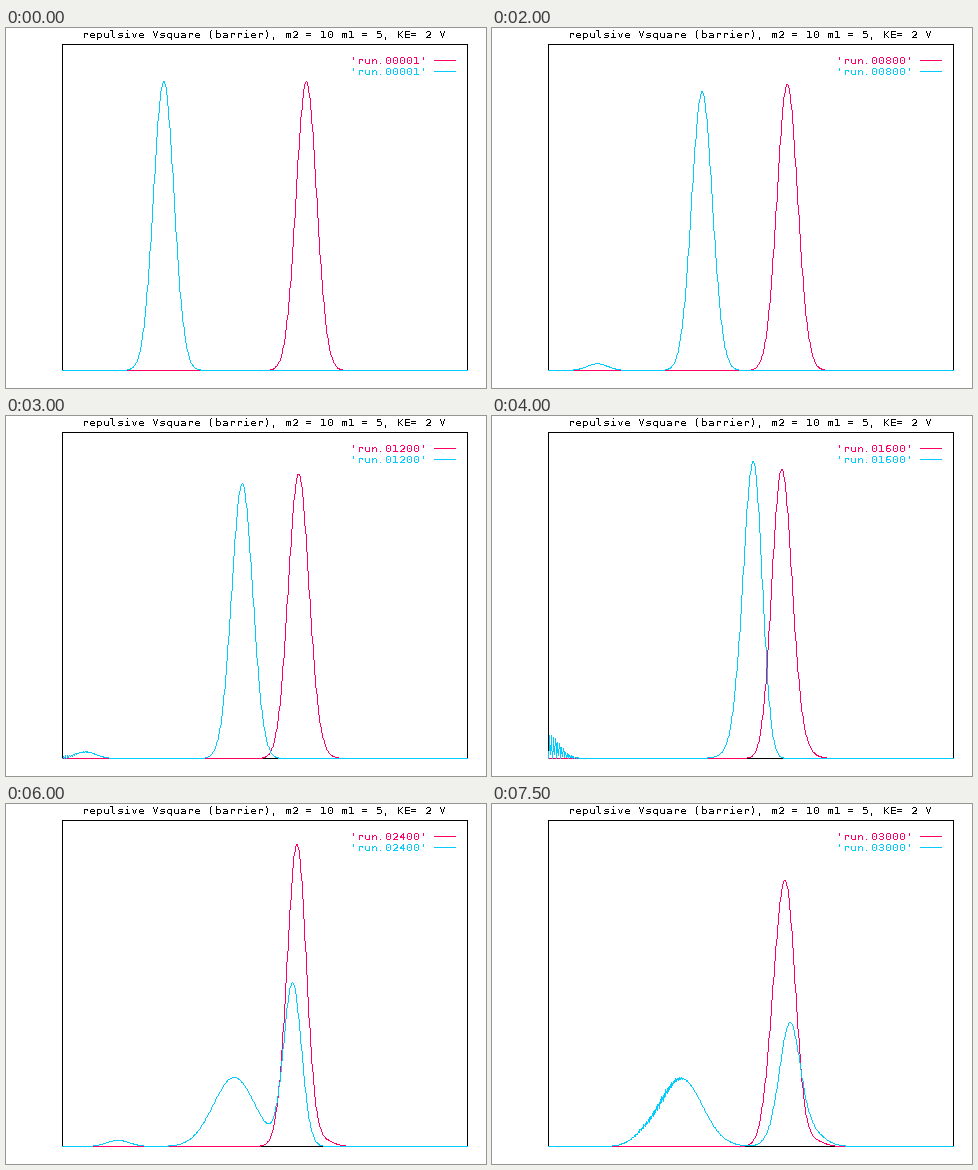
Write a matplotlib script that moves like this. It is 480x360 px and loops after 8000 ms.

```python
import numpy as np
import matplotlib as mpl
import matplotlib.pyplot as plt
from matplotlib.animation import FuncAnimation

mpl.rcParams.update({"text.antialiased": False, "text.hinting": "default",
                     "text.hinting_factor": 1})

# stage layout in pixels
W, H, DPI = 480, 360, 100
LEFT, RIGHT, TOP, BASE = 56, 461, 16, 342
PEAK, CELL = 289, 7
PX = (RIGHT - LEFT) / 1.4
BLACK, RED, CYAN = (0, 0, 0), (255, 0, 102), (0, 204, 255)

# two particles with a square barrier between them
DX, DT, SUB = 0.005, 1.25e-6, 40
FRAMES, INTERVAL = 16, 500
M1, M2 = 0.5, 5.0
K, SIGMA = 452.0, 0.05
X1, X2 = 0.35, 0.843
V0, REACH = 199500.0, 0.0626
BACK = 0.0235  # share of the packet that starts off backwards


class Box:
    """Sine basis on an interval with hard walls."""

    def __init__(self, lo, hi, mass):
        n = round((hi - lo) / DX)
        j = np.arange(1, n)
        norm = np.sqrt(2 / n)
        self.x = lo + j * DX
        self.sines = norm * np.sin(np.pi * np.outer(j, j) / n)
        k = np.pi * j / (n * DX)
        phase = np.exp(-0.5j * k**2 / mass * DT)
        self.step = ((self.sines * phase) @ self.sines).astype(np.complex64)
        self.fine = np.linspace(lo, hi, 5 * n // 2 + 1)
        self.shape = norm * np.sin(np.outer(self.fine - lo, k))

    def curve(self, psi):
        """Density of this particle, summed over the other one."""
        amp = self.shape @ (self.sines @ psi)
        rho = (np.abs(amp) ** 2).sum(axis=1) * SIGMA * np.sqrt(np.pi) / DX
        x = np.concatenate(([0], self.fine, [1.4]))
        y = np.concatenate(([0], rho, [0]))
        return LEFT + PX * x, BASE - PEAK * y


def packet(x, centre, k):
    return np.exp(-((x - centre) / SIGMA) ** 2 / 2 + 1j * k * x)


def simulate():
    one, two = Box(0, 1.1, M1), Box(0.64, 1.1, M2)
    psi = np.outer(packet(one.x, X1, K), packet(two.x, X2, -K))
    psi /= np.linalg.norm(psi)
    psi = np.sqrt(1 - BACK) * psi + np.sqrt(BACK) * psi.conj()
    psi = psi.astype(np.complex64)

    near = np.abs(one.x[:, None] - two.x) < REACH
    half = np.exp(-0.5j * V0 * DT * near).astype(np.complex64)
    full = half * half
    for _ in range(FRAMES):
        yield two.curve(psi.T), one.curve(psi)
        psi = psi * half
        for s in range(SUB):
            psi = one.step @ psi @ two.step
            psi *= full if s < SUB - 1 else half


def trace(canvas, xs, ys, color):
    """One-pixel polyline through whole-pixel vertices."""
    pts = np.floor(np.column_stack((xs, ys)) + 0.5).astype(int)
    for a, b in zip(pts[:-1], pts[1:]):
        n = max(abs(b - a).max(), 1)
        t = np.arange(n + 1)[:, None] / n
        x, y = np.floor(a + (b - a) * t + 0.5).astype(int).T
        canvas[y, x] = color


def paint(red, cyan):
    canvas = np.full((H, W, 3), 255, np.uint8)
    trace(canvas, [LEFT, RIGHT, RIGHT, LEFT, LEFT],
          [TOP, TOP, BASE, BASE, TOP], BLACK)
    for curve, y, color in ((red, 32, RED), (cyan, 43, CYAN)):
        trace(canvas, [428, 449], [y, y], color)
        trace(canvas, *curve, color)
    return canvas


pictures = [paint(*pair) for pair in simulate()]

fig = plt.figure(figsize=(W / DPI, H / DPI), dpi=DPI, facecolor="white")
ax = fig.add_axes([0, 0, 1, 1])
ax.axis("off")
image = ax.imshow(pictures[0], extent=(0, W, H, 0), aspect="auto",
                  interpolation="nearest")


def label(x, y, text, color=BLACK):
    """Fixed-cell terminal text."""
    return [ax.text(x + CELL * i, y, c, color=np.array(color) / 255,
                    family="DejaVu Sans Mono", size=10 * 72 / DPI,
                    va="baseline", parse_math=False)
            for i, c in enumerate(text)]


def run_name(i):
    return f"'run.{max(1, 200 * i):05d}'"


label(76, 10, "repulsive Vsquare (barrier), m2 = 10 m1 = 5, KE= 2 V")
keys = [label(344, 36, run_name(0), RED), label(344, 47, run_name(0), CYAN)]


def draw(i):
    image.set_data(pictures[i])
    for key in keys:
        for cell, c in zip(key, run_name(i)):
            cell.set_text(c)
    return [image]


anim = FuncAnimation(fig, draw, frames=FRAMES, interval=INTERVAL,
                     repeat=True, repeat_delay=0, blit=False)
plt.show()
```
